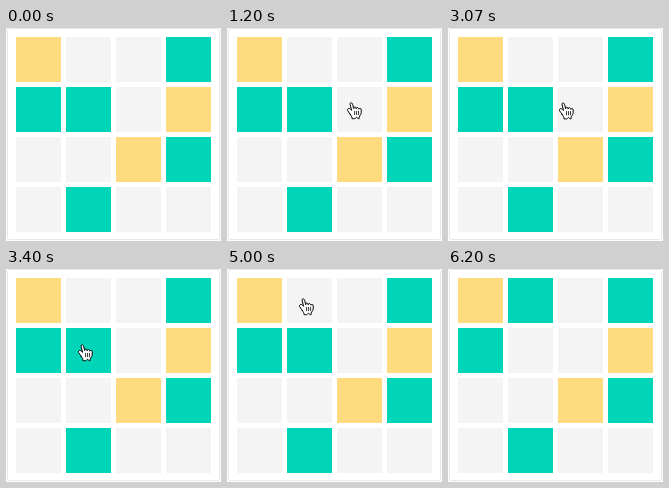
Animation of 215x213 px, one loop 7.14 s. Source, as an HTML page:

```html
<!DOCTYPE html>
<html lang="en">
<head>
<meta charset="utf-8">
<title>Moving a tile</title>
<style>
  html, body { margin: 0; width: 100%; height: 100%; overflow: hidden; background: #fff; }
  svg { display: block; width: 100vw; height: 100vh; }
  #hand { filter: drop-shadow(0 .7px .5px rgba(0, 0, 0, .3)); }
</style>
</head>
<body>
<svg viewBox="0 0 215 213">
  <rect width="215" height="213" fill="#fcfcfc"/>
  <rect x="1.5" y=".5" width="212" height="211" rx="2" fill="#fff" stroke="#e8e8e8"/>
  <g id="board"></g>
  <circle id="ring" fill="none" stroke="#777" stroke-width="2"/>
  <g id="hand" stroke="#000" stroke-width=".95" stroke-linejoin="round" stroke-linecap="round">
    <path fill="#fff" d="M3.3 12.4C2.6 11.3 1.4 9.5 .6 8.5C.2 7.4 1 6.4 1.9 6.4C3 6.5 3.8 7.6 4.6 8.4L3.2 2.7
      C2.9 1.2 3.6 .8 4.2 .8C5.1 .9 5.5 2 5.7 2.8L6.7 6.6C6.7 4.6 9 4.6 9.2 6.8C9.2 5 11.4 5 11.8 7.2
      C12.3 6.2 14.2 6 14.2 7.7V10.2C14.2 12 13.4 13 12.6 14C12 14.9 12 15.6 12.1 16.6
      C11.4 16.8 10.6 16.6 9.9 15.5Q9.5 15 9.1 15.5C8.2 17 7.3 16.7 5 16.6C5.1 15 4.6 14.4 3.3 12.4Z"/>
    <path fill="none" stroke-width=".8" d="M11.6 12.7V9.3M9.6 12.7V9.3M7.6 12.7V9.3"/>
  </g>
</svg>
<script>
const LOOP = 7140, STEP = 1000 / 15, MOVE = 7 * STEP;
const COLORS = { y: '#ffdb80', g: '#01d5b8', '.': '#f4f4f4' };
const BEFORE = 'y..g' + 'gg.y' + '..yg' + '.g..';
const AFTER = 'yg.g' + 'g..y' + '..yg' + '.g..';
const SWAP_AT = 5470;

// Pointer trips, each eased over MOVE ms
const moves = [
  { at: 11 * STEP, from: [215, 146], to: [120, 74] },
  { at: 44 * STEP, from: [120, 74], to: [72, 75] },
  { at: 68 * STEP, from: [72, 75], to: [72, 29] },
  { at: 89 * STEP, from: [72, 29], to: [116, -71] }
];
const clicks = [
  { at: 28 * STEP, frames: 3, x: 124, y: 75 },
  { at: 58 * STEP, frames: 2, x: 76, y: 75 },
  { at: 81 * STEP, frames: 2, x: 76.5, y: 31 }
];

const board = document.getElementById('board');
const ring = document.getElementById('ring');
const hand = document.getElementById('hand');

function setAttrs(el, attrs) {
  for (const key in attrs) el.setAttribute(key, attrs[key]);
}

const tiles = [...BEFORE].map((_, i) => {
  const tile = document.createElementNS('http://www.w3.org/2000/svg', 'rect');
  setAttrs(tile, { x: 10 + 50 * (i % 4), y: 9 + 50 * Math.floor(i / 4), width: 45, height: 45 });
  return board.appendChild(tile);
});

const ease = p => (1 - Math.cos(Math.PI * Math.min(1, Math.max(0, p)))) / 2;

function pointerAt(t) {
  const trip = moves.filter(m => t >= m.at).pop() || moves[0];
  const p = ease((t - trip.at) / MOVE);
  return trip.from.map((v, i) => v + (trip.to[i] - v) * p);
}

function render(time) {
  // Motion advances at 15 steps per second
  const t = Math.floor((time + 5) / STEP) * STEP + 0.01;

  const layout = time < SWAP_AT ? BEFORE : AFTER;
  tiles.forEach((tile, i) => tile.setAttribute('fill', COLORS[layout[i]]));

  const [x, y] = pointerAt(t);
  hand.setAttribute('transform', `translate(${x} ${y})`);

  const click = clicks.find(c => t >= c.at && t < c.at + c.frames * STEP);
  if (click) {
    const p = (t - click.at) / ((click.frames - 1) * STEP);
    setAttrs(ring, { cx: click.x, cy: click.y, r: 18 + 12 * p, opacity: 0.5 - 0.3 * p });
  } else {
    ring.setAttribute('opacity', 0);
  }
}

const start = performance.now();
function tick() {
  render((performance.now() - start) % LOOP);
  requestAnimationFrame(tick);
}
tick();
</script>
</body>
</html>
```
